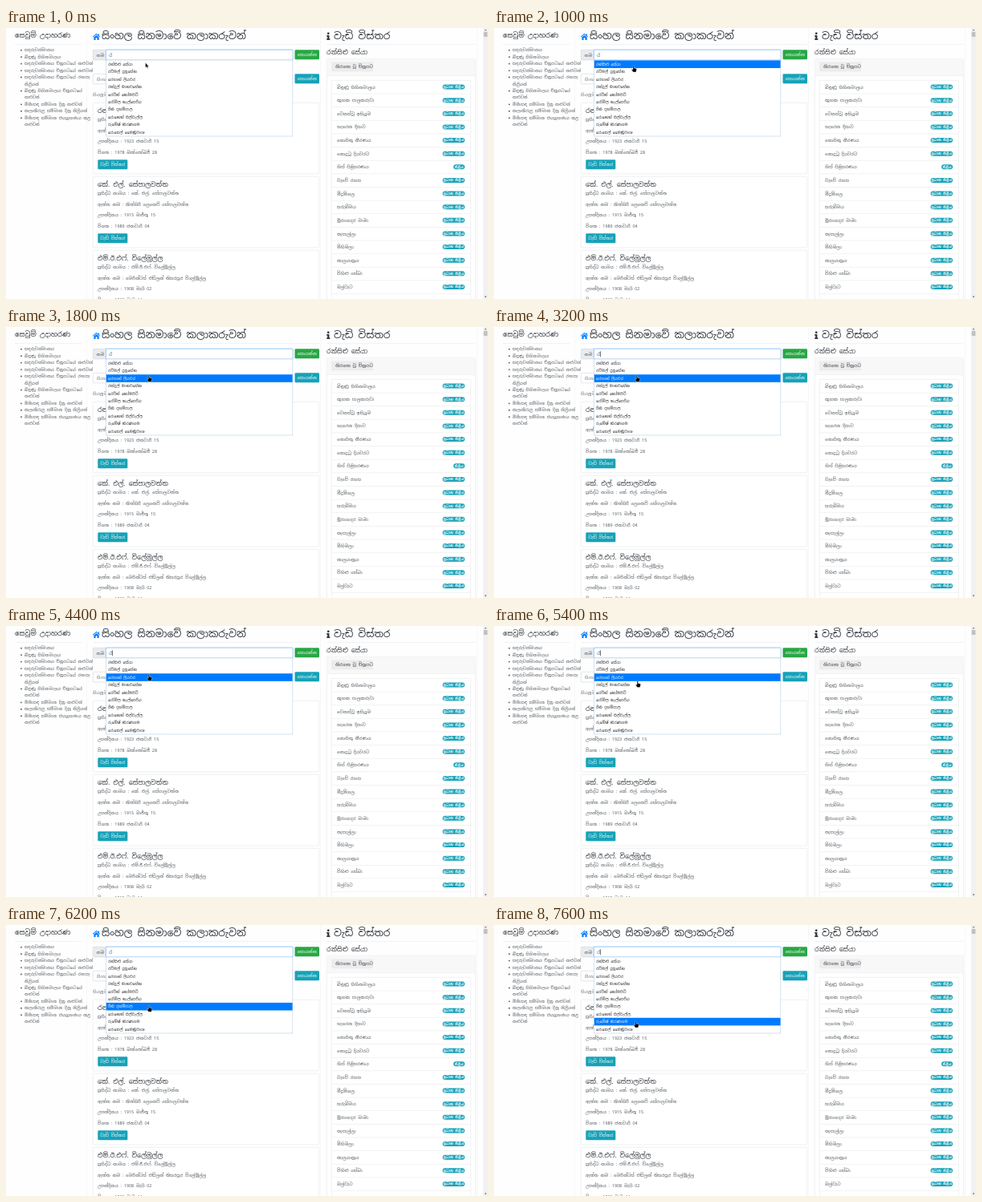
Animation, 600 px wide and 338 px high, one loop 8 s. Source, as an HTML page:

```html
<!DOCTYPE html>
<html lang="si">
<head>
<meta charset="utf-8">
<style>
html, body { margin: 0; width: 100%; height: 100%; overflow: hidden; background: #fefefe; }
svg { display: block; width: 100%; height: 100%; }
text { font-family: "Noto Sans Sinhala", "Noto Sans", sans-serif; white-space: pre; }
</style>
</head>
<body>
<svg id="stage" viewBox="0 0 600 338"></svg>
<script>
const stage = document.getElementById('stage');
const INK = '#343a40', GREY = '#50565b', LINE = '#e4e6e8', BLUE = '#007bff', TEAL = '#17a2b8', GREEN = '#28a745';
const BODY = 5.4;

function add(tag, attrs, content = '') {
  const el = document.createElementNS('http://www.w3.org/2000/svg', tag);
  for (const key in attrs) el.setAttribute(key, attrs[key]);
  el.textContent = content;
  return stage.appendChild(el);
}
// A joiner between virama and ra forms the Sinhala conjunct
const joinConjuncts = content => content.replace(/\u0dca\u0dbb/g, '\u0dca\u200d\u0dbb');
const box = (x, y, width, height, fill, more = {}) => add('rect', { x, y, width, height, fill, ...more });
const frame = (x, y, w, h, stroke = LINE, fill = '#fff', rx = 1) =>
  box(x, y, w, h, fill, { stroke, rx, 'stroke-width': 0.6 });
const label = (x, y, content, size = BODY, fill = GREY, more = {}) =>
  add('text', { x, y, 'font-size': size, fill, ...more }, joinConjuncts(content));
const path = (d, fill, more = {}) => add('path', { d, fill, ...more });
const centered = { 'text-anchor': 'middle' };

function button(x, y, w, content, fill) {
  box(x, y, w, 12, fill, { rx: 1.3 });
  label(x + w / 2, y + 7.9, content, BODY, '#fff', centered);
}

// Page columns and rules
for (const x of [100.5, 391.5, 586.5]) box(x, 0, 0.5, 338, '#f0f1f2');
for (const [x, w] of [[11, 84], [108, 282], [399, 186]]) box(x, 20, w, 0.5, LINE);

// Example searches
const FILM = 'බිඳුණු සිහිනමාලය', EPIC = 'සඳරුවන්මානය', AWARD = 'මිණිසඳ සම්මාන';
label(11, 11.5, 'සෙවුම් උදාහරණ', 8.6, INK);
[
  [EPIC],
  [FILM],
  [EPIC + ' චිත්රපටයේ නළුවන්'],
  [EPIC + ' චිත්රපටයේ නළුවන්'],
  [EPIC + ' චිත්රපටයේ රඟපෑ', 'නිළියන්'],
  [FILM + ' චිත්රපටයේ', 'නළුවන්'],
  [AWARD + ' දිනූ නළුවන්'],
  ['කලාකිරුළ සම්මාන දිනූ නිළියන්'],
  [AWARD + ' ජයග්රහණය කළ', 'නළුවන්']
].reduce((y, lines) => {
  add('circle', { cx: 19, cy: y - 1.6, r: 0.9, fill: GREY });
  lines.forEach((line, i) => label(23, y + i * 8.45, line, 5.1));
  return y + lines.length * 8.45;
}, 29.3);

// Search area
path('M107.8 11L112.5 6.8L114.8 8.8V7.4H116V9.9L117.3 11L116.6 11.6L112.5 8.1L108.5 11.6Z' +
     'M109.4 11.5L112.5 8.9L115.7 11.5V15H113.5V12.3H111.6V15H109.4Z', BLUE);
label(119, 14.3, 'සිංහල සිනමාවේ කලාකරුවන්', 12.4, INK);

frame(108.3, 27.3, 17, 12.6, '#ced4da', '#e9ecef');
label(112.5, 35.6, 'නම');
box(123.5, 26, 234.5, 15, '#007bff', { rx: 2, opacity: 0.14 });
frame(124.5, 27.3, 232.5, 12.6, '#80bdff');
label(128.3, 35.7, 'ර', 5.8);
button(359.5, 27.2, 30.5, 'සොයන්න', GREEN);

frame(108.3, 57.3, 248.7, 12.6, '#ced4da');
label(113, 65.5, 'සිංහල', BODY, '#6c757d');
button(359.5, 57.2, 30.5, 'සොයන්න', TEAL);
label(108, 85.3, 'සියලුම', BODY, '#6c757d');

// Artist cards
const STAR = 'රන්සිළු සේයා';
[
  [STAR, 'රන්සිළු මෙරිනා සේයා', '1923 ජනවාරි 15', '1978 ඔක්තෝබර් 28'],
  ['කේ. එල්. සේපාලවත්ත', 'කිත්සිරි ලෙනෙව් සේපාලවත්ත', '1915 මාර්තු 15', '1989 ජනවාරි 04'],
  ['එම්.ඊ.එෆ්. විලේමුල්ල', 'මෙරින්ටස් එඩ්ලන් තිසරපුර විලේමුල්ල', '1908 මැයි 02', '1965 මැයි 14']
].forEach(([name, fullName, born, died], i) => {
  const y = 93.3 + i * 92;
  frame(108.3, y, 281.4, 88.5);
  label(114, y + 12.2, name, 8, INK);
  ['ප්රසිද්ධ නාමය : ' + name, 'ඇත්ත නම : ' + fullName, 'උපන්දිනය : ' + born, 'විගත : ' + died]
    .forEach((line, row) => label(114, y + 22.8 + row * 13.5, line));
  button(114.3, y + 71, 37, 'වැඩි විස්තර', TEAL);
});

// Details panel
box(400, 5.6, 2.4, 2.4, INK, { rx: 0.6 });
path('M399.2 9H402.4V13.2H403.3V15H399.2V13.2H400.1V10.7H399.2Z', INK);
label(408, 14.3, 'වැඩි විස්තර', 12.2, INK);
label(399, 33, STAR, 7.8, INK);
frame(399.3, 38.3, 185, 310);
box(399.6, 38.6, 184.4, 20.4, '#f8f8f8');
box(399.6, 59, 184.4, 0.5, LINE);
box(405, 42.5, 52, 11.8, '#ececed', { rx: 1 });
label(410, 50.2, 'තිරගත වූ චිත්රපට', BODY, INK);
frame(405.3, 65.3, 173, 290);
[
  FILM, 'කුහක පාලකරුවා', 'වෙනස්වූ ඉසියුම', 'හැරෙන දිසාව', 'නොසිතූ තීරණය', 'නොදුටු දියවරට',
  'හිස් පිළිසරණය', 'වැවේ රහස', 'මීදුම්ගල', 'සරුබිමය', 'මුරගෙදර මාමා', 'තැපැල්ලා', 'මිහිමලා',
  'කාලයාත්රය', 'විහිළු සේබා', 'මල්වැට'
].forEach((title, i) => {
  const y = 65.3 + i * 16.63, minor = i === 6, w = minor ? 14 : 27.5;
  box(405.5, y + 16.5, 172.6, 0.5, LINE);
  label(412, y + 10.3, title);
  box(571 - w, y + 5.2, w, 6, TEAL, { rx: 3 });
  label(571 - w / 2, y + 9.6, minor ? 'නිළිය' : 'ප්රධාන නිළිය', 4.1, '#fff', { ...centered, 'font-weight': 700 });
});

// Scrollbar
box(594, 0, 6, 338, '#f1f1f1');
box(594.7, 5, 4.6, 6, '#c1c1c1');
path('M595.6 3.3L597 1.7L598.4 3.3ZM595.6 334.6L597 336.2L598.4 334.6Z', '#606060');

// Suggestions
const ROW = 9.42, LIST_TOP = 40.4;
frame(124.5, 40, 232.3, 95, '#b9cfe4', '#fff', 0);
const highlight = box(124.8, 0, 231.8, 9.6, BLUE);
const options = [
  STAR, 'රවිමල් දුනුසේන', 'රෙහාන් ලියවර', 'රන්දුල් මානවසේක', 'රෙවින් කෝමපිටි',
  'රෝමිල තැල්පෙරිය', 'රිනි දහම්පාල', 'රොනෙත් සිල්වැල්ල', 'රුමේෂ් කිරණගම', 'රොසෙල් මෛත්රීවංශ'
].map((name, i) => label(127, LIST_TOP + i * ROW + 6.5, name, 4.7));
const caret = box(132.3, 30.3, 0.6, 7, '#222');

const outline = { stroke: '#fff', 'stroke-width': 0.4 };
const arrow = path('M0 0V6.3L1.5 5L2.5 7.2L3.5 6.8L2.5 4.6H4.4Z', '#000', outline);
const hand = path('M0 0.6Q0.7 -0.5 1.4 0.6V3L4 3.5Q4.7 3.8 4.5 4.8L3.8 8H0.2L-1.7 5.2Q-1.9 4.3 -1 4.3L0 5.1Z', '#000', outline);

// Pointer tip: time, x, y
const route = [
  [0, 173.5, 43.3], [1000, 173, 47], [1400, 175.5, 53], [1800, 177.2, 60.2], [5200, 177.2, 60.2],
  [5400, 178, 68.4], [5800, 178, 90.5], [7000, 175.7, 120]
];

function pointerAt(t) {
  const next = route.findIndex(key => key[0] > t);
  if (next < 0) return route[route.length - 1].slice(1);
  const [t0, x0, y0] = route[next - 1], [t1, x1, y1] = route[next];
  const k = (t - t0) / (t1 - t0);
  return [x0 + (x1 - x0) * k, y0 + (y1 - y0) * k];
}

const show = (el, on) => el.setAttribute('visibility', on ? 'visible' : 'hidden');

function draw(now) {
  const t = Math.floor(now % 8000 / 200) * 200;
  const [x, y] = pointerAt(t);
  const active = t ? Math.floor((y - LIST_TOP) / ROW) : -1;
  show(highlight, active >= 0);
  highlight.setAttribute('y', LIST_TOP + active * ROW);
  options.forEach((el, i) => el.setAttribute('fill', i === active ? '#fff' : '#222'));
  show(arrow, active < 0);
  show(hand, active >= 0);
  for (const el of [arrow, hand]) el.setAttribute('transform', `translate(${x} ${y})`);
  show(caret, (t + 1055) % 1060 < 530);
  requestAnimationFrame(draw);
}
draw(0);
</script>
</body>
</html>
```
